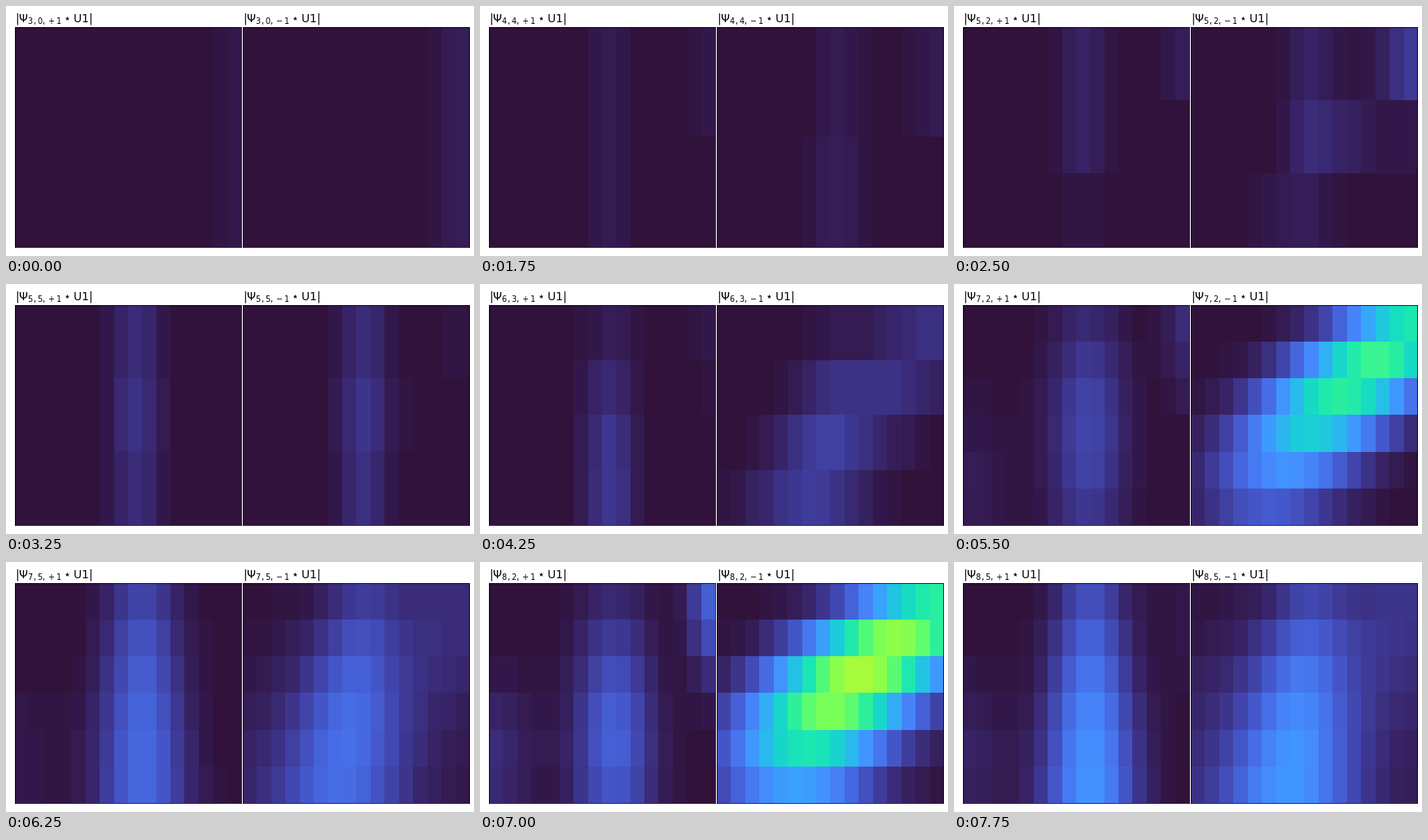
Animation of 575x308 px, one loop 8 s. Source, as a matplotlib script:

```python
import numpy as np
import matplotlib.pyplot as plt
from matplotlib.animation import FuncAnimation

W, H, DPI = 575, 308, 72
COLS = 16
TOP, BOTTOM = 25.6, 296.6

plt.rcParams["font.family"] = "DejaVu Sans"
plt.rcParams["mathtext.fontset"] = "dejavusans"

# Per time scale j = 3..8
ROWS = [1, 2, 3, 4, 6, 6]
ORDERS = [3, 5, 6, 6, 6, 6]
COLUMN = [0, .02, .046, .073, .125, .19]
COLUMN_WIDTH = [1.2, 1.2, 1.2, 1.2, 1.7, 1.75]
COLUMN_SHIFT = [-.4, -.4, -.5, .05, -.15, 0]
RIDGE = [0, .006, .02, .065, .39, .51]
RIDGE_WIDTH = [2.4, 2.4, 2.4, 2.5, 3.5, 3.9]
RIDGE_PEAK = [.4, .4, .4, .4, .28, .4]
CORNER = {1: [.028, .025, .02, .013, .037, .11],
          -1: [.05, .03, .04, 0, 0, 0]}
FOOT = [0, 0, 0, 0, .017, .037]

# Per frequency order l = 0..5
COLUMN_GAIN = [.3, .45, .6, .75, .9, 1]
RIDGE_GAIN = [.4, .75, 1, .7, .4, .1]

STEPS = [(j + 3, l) for j, n in enumerate(ORDERS) for l in range(n)]


def bell(x, width):
    return np.exp(-.5 * (x / width) ** 2)


def response(j, l, spin):
    """Wavelet response as a rows x columns array of colour levels."""
    k = j - 3
    n = ROWS[k]
    r = np.arange(n)[:, None]
    c = np.arange(COLS)[None, :]
    y = r / max(n - 1, 1)
    mid = (r + .5) / n
    low = max(l - 2, 0)

    # upright band near the middle
    center = 8.05 if j < 7 else 8.2 + .06 * l
    width = COLUMN_WIDTH[k] + (.08 * l * y if j > 6 else 0)
    reach = .25 + .11 * l
    gain = 1
    if spin < 0 and j > 5:
        center = 7.8 - 1.3 * y
        width = COLUMN_WIDTH[k] + 1.1 * y
        reach = .65
        gain = .8 * np.sqrt(low / 3)
    peak = .58 + .085 * l + COLUMN_SHIFT[k]
    level = (gain * COLUMN[k] * COLUMN_GAIN[l] * bell(y - peak, reach)
             * bell(c - center, width))

    # glow in the upper right
    level = level + (CORNER[spin][k] * RIDGE_GAIN[l] * bell(y, .27)
                     * bell(c - 15.3, 1.1 if spin > 0 else 1.35))

    if spin > 0:
        level += (FOOT[k] * (1.2 - .1 * l) * bell(y - .85, .3)
                  * bell(c + .5, 2.2))
    else:
        # slanted ridge
        path = 5 + 12 * (1 - mid) ** (.2 + .2 * j)
        width = RIDGE_WIDTH[k] * (1 + .25 * low) * (1.06 - .12 * mid)
        level += (RIDGE[k] * RIDGE_GAIN[l]
                  * bell(mid - RIDGE_PEAK[k], .39 + .25 * low)
                  * bell(c - path, width))
    return level


def label(j, l, spin):
    return rf"$|\Psi_{{{j}, {l}, {spin:+d}}} \star \mathrm{{U1}}|$"


def add_panel(left, right):
    ax = fig.add_axes([left / W, 1 - BOTTOM / H,
                       (right - left) / W, (BOTTOM - TOP) / H])
    ax.set_xticks([])
    ax.set_yticks([])
    img = ax.imshow(np.zeros((1, COLS)), cmap="turbo", vmin=0, vmax=1,
                    aspect="auto", interpolation="nearest",
                    extent=(0, 1, 0, 1))
    return ax, img


fig = plt.figure(figsize=(W / DPI, H / DPI), dpi=DPI, facecolor="white")
panels = {1: add_panel(10.7, 288.7), -1: add_panel(290.7, 568.7)}


def draw(i):
    j, l = STEPS[i]
    for spin, (ax, img) in panels.items():
        img.set_data(response(j, l, spin))
        ax.set_title(label(j, l, spin), loc="left", fontsize=14, pad=6.5, y=1)
    return []


anim = FuncAnimation(fig, draw, frames=len(STEPS), interval=250,
                     repeat=True, repeat_delay=0, blit=False)
plt.show()
```
